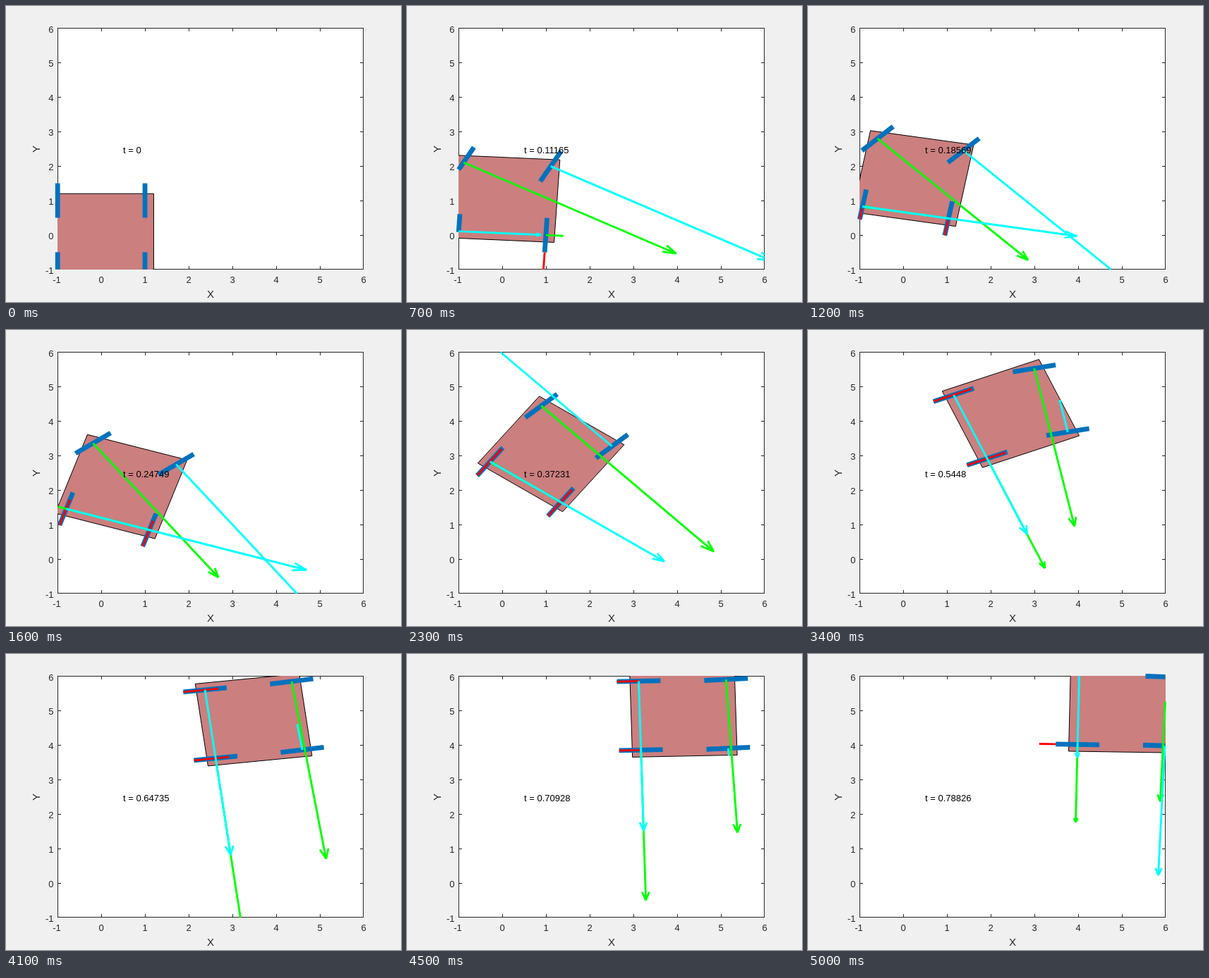
Recreate the animation shown at these times as an HTML page with a canvas. Size 560 by 420 pixels, loop 5.1 s.

```html
<!DOCTYPE html>
<html lang="en">
<head>
<meta charset="utf-8">
<title>Car path</title>
<style>
html, body { margin: 0; width: 100%; height: 100%; overflow: hidden; background: #f0f0f0; }
canvas { display: block; }
</style>
</head>
<body>
<canvas id="stage" width="560" height="420"></canvas>
<script>
const ctx = document.getElementById('stage').getContext('2d');
const STEP = 100, STEPS = 51;
const LO = -1, HI = 6;
const FONT = '"Liberation Sans", Arial, sans-serif';
const INK = '#262626', BLUE = '#0072bd', GREEN = '#00ff00', CYAN = '#00ffff', RED = '#ff0000';

const px = x => 73.2 + (x - LO) * 61.9;
const py = y => 373.8 - (y - LO) * 48.9;

// key points: step, clock, centre x, centre y, steering in degrees
const PATH = [
  [0, 0, 0, 0, 0],
  [7, 0.11165, 0.055, 1.05, 25.3],
  [16, 0.24749, 0.456, 2.1, 35.7],
  [23, 0.37231, 1.115, 3.047, 11],
  [34, 0.5448, 2.46, 4.222, 11.2],
  [41, 0.64735, 3.489, 4.733, -1.7],
  [50, 0.78826, 5.01, 5, 1.2]
];

// Smooth curve through the key points, one value per column.
function follow(keys, i) {
  const last = keys.length - 1;
  let k = 0;
  while (k < last - 1 && i >= keys[k + 1][0]) k++;
  const a = keys[k], b = keys[k + 1];
  const h = b[0] - a[0], s = (i - a[0]) / h;
  const slope = (n, c) => {
    const rise = m => (keys[m + 1][c] - keys[m][c]) / (keys[m + 1][0] - keys[m][0]);
    if (n === 0) return rise(0);
    if (n === last) return rise(last - 1);
    const w = (keys[n + 1][0] - keys[n][0]) / (keys[n + 1][0] - keys[n - 1][0]);
    return rise(n - 1) * w + rise(n) * (1 - w);
  };
  return a.slice(1).map((v, j) => {
    const c = j + 1;
    return v + (b[c] - v) * s * s * (3 - 2 * s)
      + h * s * (1 - s) * ((1 - s) * slope(k, c) - s * slope(k + 1, c));
  });
}

// Degrees clockwise from up: a slightly late quarter turn.
const turn = i => 91.1 * Math.sin(Math.PI / 2 * (i / 50) ** 1.08) ** 2;

const wave = (i, peak, period) => Math.cos(2 * Math.PI * (i - peak) / period);

// Signed arrow lengths at step i.
function forces(i) {
  const ramp = Math.min(1, i / 3);
  const edge = ((i - 28.8) / 21.5) ** 4;
  return {
    frontL: ramp * (5.3 - 1.2 * ((i - 20) / 30) ** 2 + 0.5 * wave(i, 6, 17.3)),
    frontR: ramp * (i < 20 ? 5.75 : 5.2 * ((i - 37) / 13.5) ** 3 - 0.88),
    rearL: ramp * (4.95 - 2.9 * edge + (1.7 - 0.03 * i) * wave(i, 15, 32)),
    rearR: ramp * (1 - 4 * wave(i, 17.5, 46.5)),
    drive: ramp * (0.95 - 1.4 * edge)
  };
}

// Cuts a segment to the axes; the stroke width may still overlap the border.
function clip(x0, y0, x1, y1) {
  let s = 0, e = 1;
  const dx = x1 - x0, dy = y1 - y0;
  for (const [d, room] of [[-dx, x0 - LO], [dx, HI - x0], [-dy, y0 - LO], [dy, HI - y0]]) {
    if (Math.abs(d) < 1e-9) {
      if (room < -1e-9) return null;
    } else if (d < 0) s = Math.max(s, room / d);
    else e = Math.min(e, room / d);
  }
  return s < e ? [x0 + dx * s, y0 + dy * s, x0 + dx * e, y0 + dy * e] : null;
}

function line(x0, y0, x1, y1, color, width) {
  const c = clip(x0, y0, x1, y1);
  if (!c) return;
  ctx.strokeStyle = color;
  ctx.lineWidth = width;
  ctx.beginPath();
  ctx.moveTo(px(c[0]), py(c[1]));
  ctx.lineTo(px(c[2]), py(c[3]));
  ctx.stroke();
}

function arrow([x, y], [dx, dy], size, color) {
  if (Math.abs(size) < 0.01) return;
  const u = dx * size, v = dy * size, tx = x + u, ty = y + v;
  line(x, y, tx, ty, color, 2.9);
  for (const side of [-0.019, 0.019]) {
    line(tx, ty, tx - 0.055 * u + side * v, ty - 0.055 * v - side * u, color, 2.7);
  }
}

function text(str, x, y, size, align, color) {
  ctx.font = size + 'px ' + FONT;
  ctx.textAlign = align;
  ctx.fillStyle = color;
  ctx.fillText(str, x, y);
}

function drawAxes() {
  ctx.fillStyle = '#f0f0f0';
  ctx.fillRect(0, 0, 560, 420);
  ctx.fillStyle = '#fff';
  ctx.fillRect(73, 31, 434, 343);
  ctx.strokeStyle = INK;
  ctx.lineWidth = 1;
  ctx.strokeRect(73.5, 31.5, 433, 342);
  ctx.beginPath();
  for (let n = LO; n <= HI; n++) {
    const x = Math.round(px(n)), y = Math.round(py(n));
    text(n, x - (n < 0 ? 1 : 0), 393, 13, 'center', INK);
    text(n, 67.5, y + 6, 13, 'right', INK);
    if (n === LO || n === HI) continue;
    for (const [from, to] of [[373, 369], [32, 36]]) {
      ctx.moveTo(x + 0.5, from);
      ctx.lineTo(x + 0.5, to);
    }
    for (const [from, to] of [[74, 78], [506, 502]]) {
      ctx.moveTo(from, y + 0.5);
      ctx.lineTo(to, y + 0.5);
    }
  }
  ctx.stroke();
  text('X', 290, 414, 15, 'center', INK);
  ctx.save();
  ctx.translate(48, 203);
  ctx.rotate(-Math.PI / 2);
  text('Y', 0, 0, 15, 'center', INK);
  ctx.restore();
}

const heading = deg => [Math.sin(deg * Math.PI / 180), Math.cos(deg * Math.PI / 180)];
const rightOf = ([x, y]) => [y, -x];

function draw(i) {
  const [clock, cx, cy, steer] = follow(PATH, i);
  const force = forces(i);
  const f = heading(turn(i)), r = rightOf(f);
  const w = heading(turn(i) + steer), wr = rightOf(w);
  const at = (a, b) => [cx + a * f[0] + b * r[0], cy + a * f[1] + b * r[1]];
  const frontL = at(1, -1), frontR = at(1, 1), rearL = at(-1, -1), rearR = at(-1, 1);

  drawAxes();

  ctx.save();
  ctx.beginPath();
  ctx.rect(73, 31, 434, 343);
  ctx.clip();
  ctx.beginPath();
  for (const [a, b] of [[1.2, -1.2], [1.2, 1.2], [-1.2, 1.2], [-1.2, -1.2]]) {
    const [x, y] = at(a, b);
    ctx.lineTo(px(x), py(y));
  }
  ctx.closePath();
  ctx.fillStyle = '#cb7f7f';
  ctx.fill();
  ctx.strokeStyle = '#000';
  ctx.lineWidth = 1;
  ctx.stroke();
  ctx.restore();

  for (const [[x, y], [dx, dy]] of [[frontL, w], [frontR, w], [rearL, f], [rearR, f]]) {
    line(x - dx / 2, y - dy / 2, x + dx / 2, y + dy / 2, BLUE, 6.8);
  }
  arrow(at(-1.5, -1), f, force.drive, RED);
  arrow(at(-1.5, 1), f, force.drive, RED);
  arrow(frontL, wr, force.frontL, GREEN);
  arrow(rearR, r, force.rearR, GREEN);
  arrow(frontR, wr, force.frontR, CYAN);
  arrow(rearL, r, force.rearL, CYAN);

  text('t = ' + parseFloat(clock.toPrecision(5)), 166, 209, 13, 'left', '#000');
}

const start = performance.now();
let shown = -1;
function tick() {
  const i = Math.floor((performance.now() - start) / STEP) % STEPS;
  if (i !== shown) draw(shown = i);
  requestAnimationFrame(tick);
}
tick();
</script>
</body>
</html>
```
